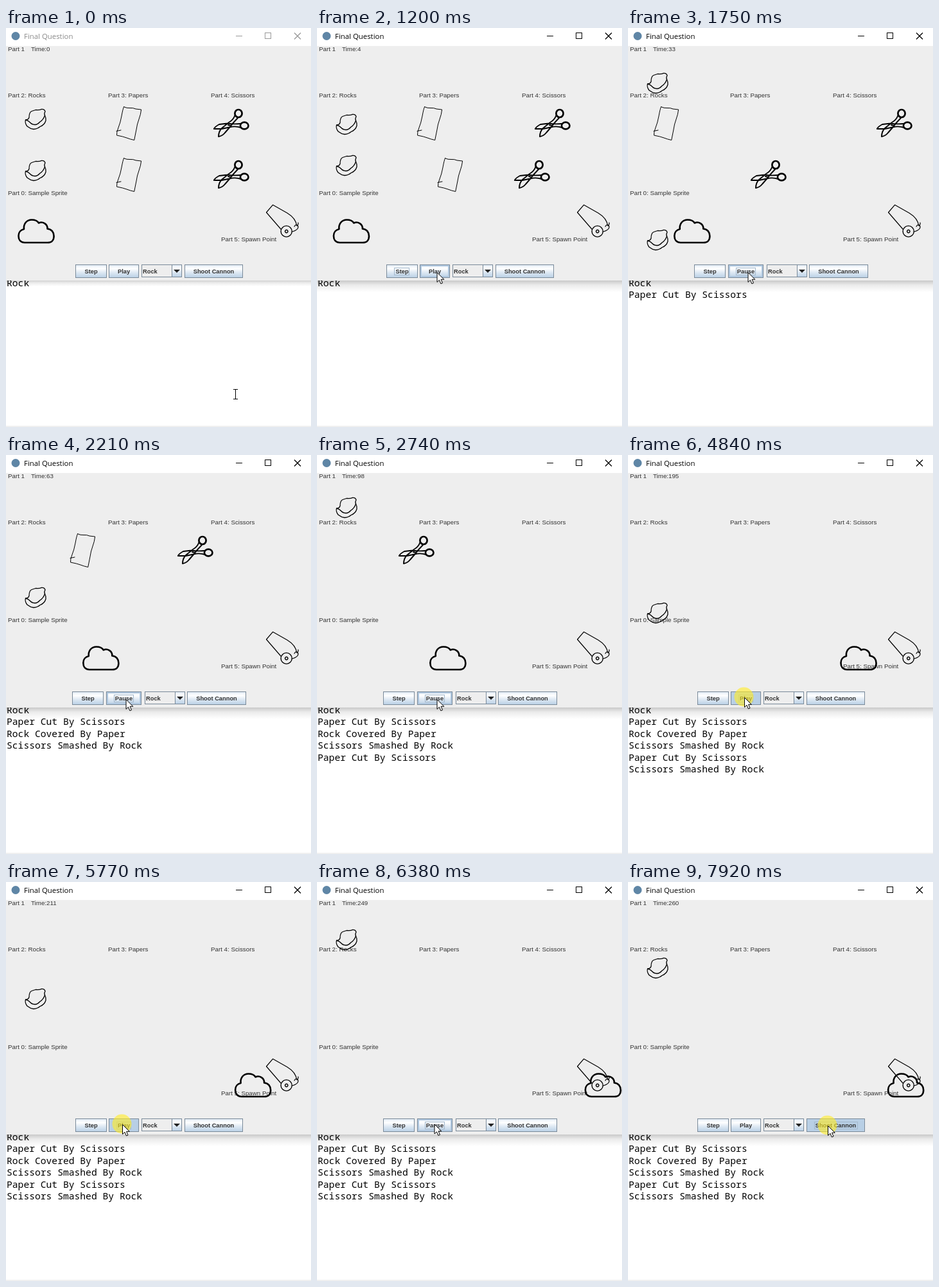
An HTML page with a canvas that plays this animation: 475x621 px, repeating every 8 s.

```html
<!DOCTYPE html>
<html lang="en">
<head>
<meta charset="utf-8">
<title>Final Question</title>
<style>
  html, body { margin: 0; width: 100%; height: 100%; overflow: hidden; background: #fff; }
  canvas { display: block; width: 475px; height: 621px; }
</style>
</head>
<body>
<canvas id="stage"></canvas>
<script>
const W = 475, H = 621, LOOP = 8000;
const canvas = document.getElementById('stage');
const ctx = canvas.getContext('2d');
const dpr = window.devicePixelRatio || 1;
canvas.width = W * dpr;
canvas.height = H * dpr;

const SANS = '"Liberation Sans", Arial, sans-serif';
const LABEL = '9.75px ' + SANS;
const BOLD = 'bold 9.3px ' + SANS;
const TITLE = '11.4px "Open Sans", "Noto Sans", sans-serif';
const MONO = '14.67px "Noto Sans Mono", "DejaVu Sans Mono", monospace';

// Outlines, relative to the top left corner of each sprite
const ROCK = [
  new Path2D('M1.5 18 Q6 18 7 14 Q7 6 11 4.5 L17 2.5 Q24 3 26 1.5 Q31 1 32 5 Q30 8 31.5 11 Q29 18 24 21 Q20 25.5 16 25.5 Q11 25 9 22.5 Q6 19 1.5 18 Z'),
  new Path2D('M1.5 18 Q0 23 4 28 Q9 32 14 32.5 Q20 32 24 28.5 Q31 26 33 19 Q33.5 15 31.5 11')
];
const PAPER = [
  new Path2D('M12.5 .7 Q17 3 22 2.5 T31 4 L39.6 5 Q39 12 36 20 T32 36 L28.7 52.5 Q22 51 17 49 T1.5 45 Q1 40 4 33 T9 15 T12.5 .7 M1 38.5 L8 37')
];
const SCISSORS = [
  new Path2D('M44.6 7 A5.6 6 0 1 1 33.4 7 A5.6 6 0 1 1 44.6 7 M54.5 26 A6.3 5.3 0 1 1 41.9 26 A6.3 5.3 0 1 1 54.5 26'),
  new Path2D('M33.5 10 Q31 17 24 21 L13 30 Q8 35 8 43 Q14 42 18 37 L25 29 Q30 22 38 14 M42 23 Q31 24 22 22.5 L9 24 Q3 27 .8 31 L13 31 L25 28.5 Q34 26 43 29 M23 25 L27 26')
];
const CLOUD = [
  new Path2D('M11 37 C4 37 1.5 32 1.5 26.5 C1.5 21 5 17 10 16 C9 8 14 1.5 22 1.5 C27 1.5 31 3 33 6.5 C39 3.5 47 8 46.5 15.5 C53 16 56.6 21 56.6 27 C56.6 33 53 37 47 37 Z')
];
const CANNON = [
  new Path2D('M428 313 L405.5 287 L415.5 275.3 L438 288 C448 294 452 301 453 308 M446 317 C452 315 455 313 455 310 C455 306 451 305 449 309 M452 306 C453 309 456 306 455 303'),
  new Path2D('M445.3 316.5 A8.6 8.6 0 1 1 428.1 316.5 A8.6 8.6 0 1 1 445.3 316.5 M439 316.5 A2.2 2.2 0 1 1 434.6 316.5 A2.2 2.2 0 1 1 439 316.5')
];
const ARROW = new Path2D('M.5 .5 V15.5 L4 12.3 L6.4 18 L9 16.9 L6.6 11.3 H11.3 Z');

// Start and end of each run: time, tick, time, tick
const RUNS = [[1300, 4, 4217, 195], [4890, 195, 5135, 211], [5796, 211, 6535, 260]];
const STEPS = [540, 680, 820, 960];
const FOCUS_TIME = 470;
const PRESSES = [
  [470, 540, 'step'], [610, 680, 'step'], [750, 820, 'step'], [890, 960, 'step'],
  [1230, 1300, 'play'], [4140, 4217, 'play'], [4830, 4890, 'play'],
  [5070, 5135, 'play'], [5765, 5796, 'play'], [6470, 6560, 'play'], [7915, 8000, 'shoot']
];
const POINTER = [
  [0, 357, 570], [70, 357, 570], [430, 135, 379], [970, 135, 379], [1150, 186.5, 380],
  [3900, 186.5, 380], [4130, 181, 377], [5765, 181, 377], [6000, 182.5, 376.5],
  [6700, 182.5, 376.5], [7540, 269, 378], [7690, 311, 379], [8000, 311, 379]
];
const MESSAGES = [
  [0, 'Rock'], [13, 'Paper Cut By Scissors'], [34, 'Rock Covered By Paper'],
  [61, 'Scissors Smashed By Rock'], [78, 'Paper Cut By Scissors'], [110, 'Scissors Smashed By Rock']
];

function tickAt(t) {
  let n = STEPS.filter(s => t >= s).length;
  for (const [t0, n0, t1, n1] of RUNS)
    if (t >= t0) n = n0 + Math.floor(Math.min(1, (t - t0) / (t1 - t0)) * (n1 - n0) + 1e-6);
  return n;
}

function pointerAt(t) {
  let i = 1;
  while (i < POINTER.length - 1 && t > POINTER[i][0]) i++;
  const [t0, x0, y0] = POINTER[i - 1], [t1, x1, y1] = POINTER[i];
  const k = (t - t0) / (t1 - t0), e = k * k * (3 - 2 * k);
  return { x: x0 + (x1 - x0) * e, y: y0 + (y1 - y0) * e };
}

// Up and down over 68 steps, resting one tick at each wall
function wave(k) {
  k %= 138;
  return k <= 68 ? k : 137 - k;
}

function text(str, x, y, font, color = '#333', align = 'left') {
  ctx.font = font;
  ctx.fillStyle = color;
  ctx.textAlign = align;
  ctx.fillText(str, x, y);
}

function rect(x, y, w, h, fill) {
  ctx.fillStyle = fill;
  ctx.fillRect(x, y, w, h);
}

function frame(x, y, w, h, color, width = 1) {
  ctx.strokeStyle = color;
  ctx.lineWidth = width;
  ctx.strokeRect(x + width / 2, y + width / 2, w - width, h - width);
}

function sprite(paths, x, y, ...widths) {
  ctx.save();
  ctx.translate(x, y);
  ctx.strokeStyle = '#000';
  ctx.lineJoin = ctx.lineCap = 'round';
  paths.forEach((p, i) => {
    ctx.lineWidth = widths[i] || widths[0];
    ctx.stroke(p);
  });
  ctx.restore();
}

function steel(y, h) {
  const g = ctx.createLinearGradient(0, y, 0, y + h);
  g.addColorStop(0, '#dde8f3');
  g.addColorStop(.3, '#fff');
  g.addColorStop(.6, '#dde8f3');
  g.addColorStop(1, '#b8cfe5');
  return g;
}

function button(b, state) {
  const { x, w, label, id } = b, y = 368, h = 21;
  rect(x, y, w, h, state.pressed === id ? '#b8cfe5' : steel(y, h));
  if (state.hover === id && state.pressed !== id) frame(x + 1, y + 1, w - 2, h - 2, '#b0c8e0', 2);
  frame(x, y, w, h, '#7a8a99');
  text(label, x + w / 2, 382, BOLD, '#333', 'center');
  if (state.focus === id) {
    const tw = ctx.measureText(label).width + 4;
    frame(Math.round(x + (w - tw) / 2), 373, Math.round(tw), 12, '#a3b8cc');
  }
}

function combo(x) {
  rect(x, 368, 63, 20, '#eee');
  rect(x + 47, 368, 16, 20, steel(368, 20));
  frame(x, 368, 63, 20, '#7a8a99');
  frame(x + 47, 368, 16, 20, '#7a8a99');
  text('Rock', x + 2, 381.5, BOLD);
  ctx.fillStyle = '#222';
  ctx.beginPath();
  ctx.moveTo(x + 50, 376);
  ctx.lineTo(x + 60, 376);
  ctx.lineTo(x + 55, 381);
  ctx.fill();
}

function consoleText(n, active) {
  rect(0, 393, W, H - 393, '#fff');
  rect(0, 619, W, 2, '#f0f0f0');
  MESSAGES.forEach(([from, str], i) => {
    if (n >= from) text(str, 1, 402 + i * 18.4, MONO, '#000');
  });
  const depth = active ? 18 : 9;
  const g = ctx.createLinearGradient(0, 393, 0, 393 + depth);
  g.addColorStop(0, active ? 'rgba(0,0,0,.21)' : 'rgba(0,0,0,.18)');
  g.addColorStop(.4, 'rgba(0,0,0,.08)');
  g.addColorStop(1, 'rgba(0,0,0,0)');
  rect(0, 393, W, depth, g);
}

function titleBar(active) {
  rect(0, 0, W, 28, '#fff');
  ctx.fillStyle = '#5f86a6';
  ctx.beginPath();
  ctx.arc(15, 12.5, 6.5, 0, 7);
  ctx.fill();
  text('Final Question', 28, 17, TITLE, active ? '#000' : '#8a8a8a');
  ctx.strokeStyle = active ? '#000' : '#999';
  ctx.lineWidth = 1;
  ctx.strokeRect(403.5, 7.5, 9, 9);
  ctx.beginPath();
  ctx.moveTo(358, 12.5); ctx.lineTo(368, 12.5);
  ctx.stroke();
  ctx.lineWidth = 1.3;
  ctx.beginPath();
  ctx.moveTo(449, 7.5); ctx.lineTo(459, 17.5);
  ctx.moveTo(459, 7.5); ctx.lineTo(449, 17.5);
  ctx.stroke();
}

function board(n) {
  rect(0, 28, W, 365, '#eee');
  text('Part 1', 3, 36, LABEL);
  text('Time:' + n, 39, 36, LABEL);
  text('Part 2: Rocks', 3, 108, LABEL);
  text('Part 3: Papers', 159, 108, LABEL);
  text('Part 4: Scissors', 319, 108, LABEL);
  text('Part 0: Sample Sprite', 3, 260, LABEL);
  text('Part 5: Spawn Point', 335, 332, LABEL);

  const rock = y => sprite(ROCK, 29, y, 1.3);
  const paper = (x, y) => sprite(PAPER, x, y, 1);
  const scissors = (x, y) => sprite(SCISSORS, x, y, 2.7, 1.9);

  if (n < 34) rock(n < 4 ? 125 + 4 * n : 45 + 4 * wave(n + 111));
  rock(n < 4 ? 205 - 4 * n : 45 + 4 * wave(n + 34));
  if (n < 78) paper(n <= 40 ? 171 - 4 * n : 11 + 4 * (n - 41), 122);
  if (n < 13) paper(171 + 4 * n, 202);
  if (n < 110) scissors(n <= 24 ? 323 + 4 * n : 419 - 4 * (n - 25), 126);
  if (n < 61) scissors(323 - 4 * n, 206);
  sprite(CANNON, 0, 0, 1.2, 1.4);
  sprite(CLOUD, n <= 250 ? 18 + 1.6 * n : 418 - 1.6 * (n - 251), 297, 2.6);
}

function pointer(p, pressed) {
  ctx.save();
  ctx.translate(p.x, p.y);
  if (pressed) {
    ctx.fillStyle = 'rgba(255,236,40,.62)';
    ctx.beginPath();
    ctx.arc(-.5, -.5, 15, 0, 7);
    ctx.fill();
  }
  ctx.lineWidth = 1;
  ctx.strokeStyle = '#000';
  if (p.y > 393) {
    ctx.beginPath();
    ctx.moveTo(-3, -7.5); ctx.lineTo(4, -7.5);
    ctx.moveTo(.5, -7.5); ctx.lineTo(.5, 7.5);
    ctx.moveTo(-3, 7.5); ctx.lineTo(4, 7.5);
    ctx.stroke();
  } else {
    ctx.fillStyle = '#fff';
    ctx.fill(ARROW);
    ctx.stroke(ARROW);
  }
  ctx.restore();
}

function draw(t) {
  const n = tickAt(t), p = pointerAt(t), active = t >= FOCUS_TIME;
  const press = PRESSES.find(([a, b]) => t >= a && t < b);
  const last = PRESSES.filter(([a]) => t >= a).pop();
  const playing = RUNS.some(([a, , b], i) => t >= a && t < (i === 2 ? 6560 : b));
  const buttons = playing
    ? [{ id: 'step', label: 'Step', x: 103, w: 49 }, { id: 'play', label: 'Pause', x: 156, w: 55 },
       { id: 'shoot', label: 'Shoot Cannon', x: 282, w: 92 }]
    : [{ id: 'step', label: 'Step', x: 108, w: 49 }, { id: 'play', label: 'Play', x: 160, w: 47 },
       { id: 'shoot', label: 'Shoot Cannon', x: 278, w: 91 }];
  const over = buttons.find(b => p.x >= b.x && p.x < b.x + b.w && p.y >= 368 && p.y < 389);
  const state = { pressed: press && press[2], focus: last && last[2], hover: over && over.id };

  ctx.setTransform(dpr, 0, 0, dpr, 0, 0);
  consoleText(n, active);
  titleBar(active);
  board(n);
  buttons.forEach(b => button(b, state));
  combo(playing ? 216 : 211);
  pointer(p, press);
}

const start = performance.now();
function loop() {
  draw((performance.now() - start) % LOOP);
  requestAnimationFrame(loop);
}
loop();
</script>
</body>
</html>
```
